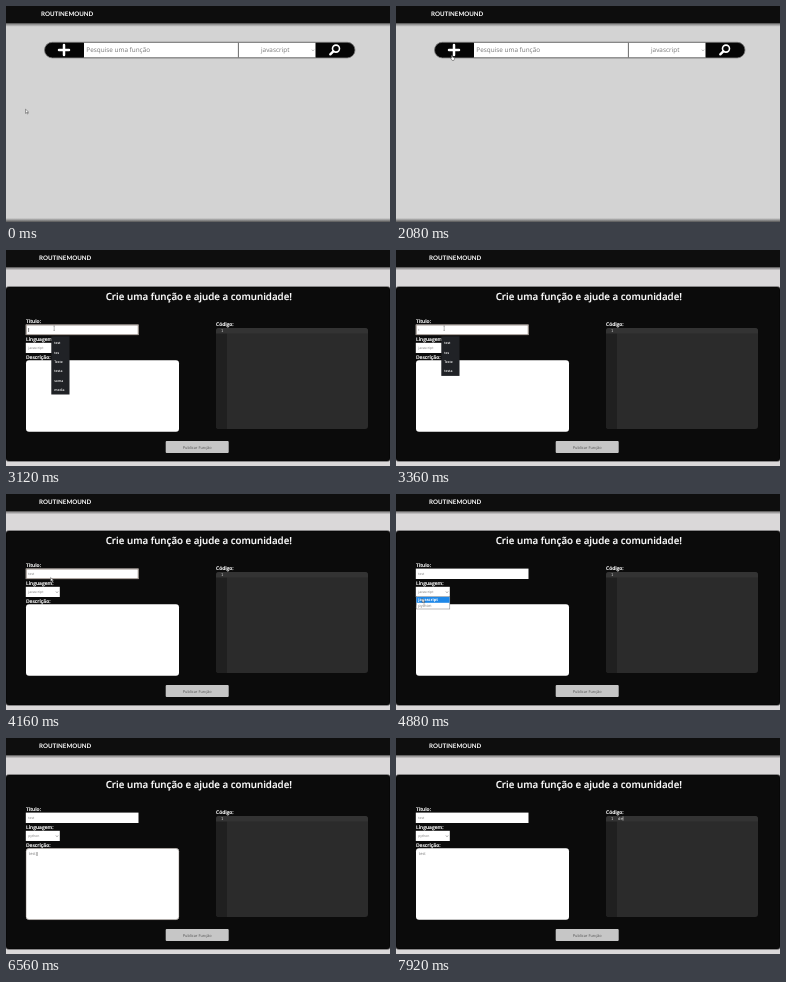
Recreate the animation shown at these times as an HTML page. Size 384 px wide and 216 px high, loop 8000 ms.

```html
<!DOCTYPE html>
<html lang="pt">
<head>
<meta charset="utf-8">
<title>Routinemound</title>
<style>
  html, body { margin: 0; height: 100%; overflow: hidden; background: #d3d3d3; }
  svg { display: block; width: 100vw; height: 100vh; }
  text { font-family: "Open Sans", "Noto Sans", sans-serif; text-rendering: geometricPrecision; white-space: pre; }
  .brand { font: 700 6.2px Lato, sans-serif; fill: #fff; }
  .search { font-size: 6.4px; fill: #777; }
  .title { font-size: 9.75px; font-weight: 600; fill: #fff; stroke: #fff; stroke-width: .15; }
  .label { font-size: 4.95px; font-weight: 600; fill: #fff; stroke: #fff; stroke-width: .15; }
  .tiny { font-size: 3.4px; fill: #777; }
  .light { fill: #fff; font-weight: 600; }
  .pick { font-size: 4px; font-weight: 700; fill: #fff; }
  .note { font-size: 4px; fill: #777; }
  .code { font: 4px "Noto Sans Mono", monospace; fill: #ddd; }
  .button { font-size: 3.9px; fill: #555; }
  .caret { stroke: #333; stroke-width: .6; }
  .ring { fill: none; stroke: #91867f; stroke-width: .9; }
</style>
</head>
<body>
<svg viewBox="0 0 384 216" preserveAspectRatio="none">
  <defs>
    <linearGradient id="shade" x2="0" y2="1">
      <stop stop-color="#000" stop-opacity=".45"/>
      <stop offset="1" stop-color="#000" stop-opacity="0"/>
    </linearGradient>
    <linearGradient id="floor" x2="0" y2="1">
      <stop stop-color="#d3d3d3"/>
      <stop offset="1" stop-color="#555"/>
    </linearGradient>
  </defs>

  <g data-show="0 2240">
    <rect width="384" height="216" fill="#d3d3d3"/>
    <rect y="212" width="384" height="4" fill="url(#floor)"/>
    <rect y="17.4" width="384" height="3.4" fill="url(#shade)"/>
    <rect width="384" height="17.4" fill="#0d0d0d"/>
    <text class="brand" x="35" y="10.4">ROUTINEMOUND</text>
    <rect x="38.5" y="36.3" width="310.5" height="15.6" rx="7.8" fill="#050505" stroke="#777" stroke-width=".8"/>
    <path d="M78 36.8h154v14.8H78zM232.6 36.8H309.5v14.8H232.6z" fill="#fff"/>
    <path d="M232.3 36.5v15.4M77.7 36.3H309.5M77.7 51.8H309.5" stroke="#8a8a8a" stroke-width=".7"/>
    <path d="M58 39v10M53 44h10" stroke="#fff" stroke-width="2.5" stroke-linecap="round"/>
    <text class="search" x="80.3" y="46.4">Pesquise uma função</text>
    <text class="search" x="255" y="46.4">javascript</text>
    <path d="M306 43.7l1 1 1-1" fill="none" stroke="#666" stroke-width=".6"/>
    <circle cx="330" cy="42.6" r="3.5" fill="none" stroke="#fff" stroke-width="1.6"/>
    <path d="M327.3 45.3l-3 3" stroke="#fff" stroke-width="2.4" stroke-linecap="round"/>
  </g>

  <g data-show="2240 8000">
    <rect width="384" height="216" fill="#dad8d9"/>
    <rect y="17.4" width="384" height="3" fill="url(#shade)"/>
    <rect width="384" height="17.4" fill="#0e0e0e"/>
    <text class="brand" x="33" y="10.4">ROUTINEMOUND</text>
    <rect y="37" width="384" height="174" rx="3" fill="#0b0b0b" stroke="#000" stroke-opacity=".5" stroke-width="1.4"/>
    <text class="title" x="99.7" y="50.4">Crie uma função e ajude a comunidade!</text>

    <text class="label" x="20" y="73.4">Título:</text>
    <rect x="19.8" y="74.6" width="112.7" height="10.4" fill="#fff"/>
    <rect class="ring" data-show="3120 4400" x="20.2" y="75" width="112" height="9.7"/>
    <text class="tiny" id="name" x="22.3" y="81.3"></text>

    <text class="label" x="20" y="91">Linguagem:</text>
    <rect x="19.8" y="92.8" width="34" height="10.2" fill="#fff"/>
    <text class="tiny" data-show="2240 5200" x="22.3" y="99.3">javascript</text>
    <text class="tiny" data-show="5200 8000" x="22.3" y="99.3">python</text>
    <path d="M50 97.6l1 1 1-1" fill="none" stroke="#444" stroke-width=".6"/>

    <text class="label" x="20" y="108.7">Descrição:</text>
    <rect x="20" y="110.3" width="153" height="71.5" rx="3" fill="#fff"/>
    <rect class="ring" data-show="5760 6880" x="20.2" y="110.5" width="152.6" height="71.1" rx="3" stroke-opacity=".5"/>
    <text class="note" id="about" x="22.8" y="117.4"></text>

    <text class="label" x="210" y="75.6">Código:</text>
    <rect x="210" y="78" width="152" height="101" rx="3" fill="#2b2b2b"/>
    <path d="M221 78h-8q-3 0-3 3v95q0 3 3 3h8z" fill="#202020"/>
    <path d="M210 83.5V81q0-3 3-3h146q3 0 3 3v2.5z" fill="#333"/>
    <text class="code" x="215" y="81.8">1</text>
    <text class="code" id="body" x="222" y="81.8"></text>

    <rect x="159.7" y="191" width="63" height="12" rx="1" fill="#c6c6c6"/>
    <text class="button" x="191.2" y="198.5" text-anchor="middle">Publicar Função</text>

    <path class="caret" data-show="3120 3280" d="M22.6 78v4"/>
    <path class="caret" data-show="5760 6240" d="M23 114v4"/>
    <path class="caret" data-show="6480 6880" d="M31 114v4"/>
    <path class="caret" data-show="7120 7680" d="M222.3 78.4v4.2" style="stroke:#ddd"/>
    <path class="caret" data-show="7840 8000" d="M227 78.4v4.2" style="stroke:#ddd"/>

    <g id="hints" data-show="3120 3920"></g>
    <g data-show="4480 5200">
      <rect x="20.2" y="102.6" width="33.6" height="12.4" fill="#fff" stroke="#777" stroke-width=".5"/>
      <g data-show="4480 5040">
        <rect x="20.4" y="102.9" width="33.2" height="5.9" fill="#1e88e8"/>
        <text class="pick" x="22.3" y="107.2">javascript</text>
        <text class="note" x="22.3" y="113.2">python</text>
      </g>
      <g data-show="5040 5200">
        <rect x="20.4" y="108.8" width="33.2" height="6" fill="#1e88e8"/>
        <text class="note" x="22.3" y="107.2">javascript</text>
        <text class="pick" x="22.3" y="113.2">python</text>
      </g>
    </g>
  </g>

  <g id="pointer">
    <path id="arrow" d="M0 0v4.1l1-.9.8 1.6.8-.4-.8-1.5h1.3z" fill="#fff" stroke="#333" stroke-width=".45"/>
    <path id="hand" d="M0 .4q.6-.8 1.1 0v1.5l2 .5v1.5l-.6 1.2H.6L-.8 3l.8-.2z" fill="#fff" stroke="#333" stroke-width=".45"/>
    <path id="beam" d="M-.8-.2h1.6M0-.2v4.4M-.8 4.2h1.6" fill="none" stroke="#777" stroke-width=".5"/>
  </g>
</svg>
<script>
const LOOP = 8000, STEP = 80;
const $ = id => document.getElementById(id);

// Pointer stops: time, x, y
const path = [
  [0, 19.5, 103.2], [720, 19.5, 103.2], [1600, 55.3, 49.6], [2240, 55.5, 49.2],
  [2880, 48.2, 76.2], [4000, 48.2, 76.2], [4400, 38, 97], [4800, 26, 104.5], [4880, 26, 104.5],
  [5120, 27, 111], [5280, 27, 111], [5680, 38, 125], [6800, 38, 125], [7120, 250, 78.5], [8000, 250, 78.5]
];
const beamTimes = [[2800, 4160], [5440, 8000]];
const hiddenTimes = [[3520, 4000], [6240, 6800], [7600, 8000]];

// Text and the time each letter appears
const typing = {
  name: ["test", [3280, 3440, 3600, 3680]],
  about: ["test", [6240, 6320, 6400, 6480]],
  body: ["de", [7680, 7840]]
};

const hintWords = ["test", "tes", "Teste", "testa", "soma", "media"];
const within = (t, [from, to]) => t >= from && t < to;
const during = (t, spans) => spans.some(span => within(t, span));
const show = (el, on) => { el.style.display = on ? "" : "none"; };

const timed = [...document.querySelectorAll("[data-show]")]
  .map(el => [el, el.dataset.show.split(" ").map(Number)]);

function hintList(count) {
  const rows = hintWords.slice(0, count).map((word, i) =>
    `<text class="tiny light" x="48.2" y="${94.3 + i * 9.3}">${word}</text>`);
  return `<rect x="45.3" y="86.3" width="18.2" height="${2.4 + count * 9.3}" fill="#202226"/>` + rows.join("");
}

function pointerAt(t) {
  const i = path.findIndex((stop, n) => n && t <= stop[0]);
  const [t0, x0, y0] = path[i - 1], [t1, x1, y1] = path[i];
  const p = (t - t0) / (t1 - t0), ease = p * p * (3 - 2 * p);
  return [x0 + (x1 - x0) * ease, y0 + (y1 - y0) * ease];
}

let shownHints = 0;
function draw(t) {
  for (const [el, span] of timed) show(el, within(t, span));
  for (const id in typing) {
    const [word, times] = typing[id];
    $(id).textContent = word.slice(0, times.filter(at => t >= at).length);
  }
  const count = t < 3280 ? 6 : 4;
  if (count !== shownHints) $("hints").innerHTML = hintList(shownHints = count);

  const beam = during(t, beamTimes), hand = within(t, [1680, 2240]);
  $("pointer").setAttribute("transform", `translate(${pointerAt(t)})`);
  show($("pointer"), !during(t, hiddenTimes));
  show($("beam"), beam);
  show($("hand"), hand);
  show($("arrow"), !beam && !hand);
}

const start = performance.now();
function tick() {
  const t = (performance.now() - start + 1) % LOOP;
  draw(Math.floor(t / STEP) * STEP);
  requestAnimationFrame(tick);
}
tick();
</script>
</body>
</html>
```
